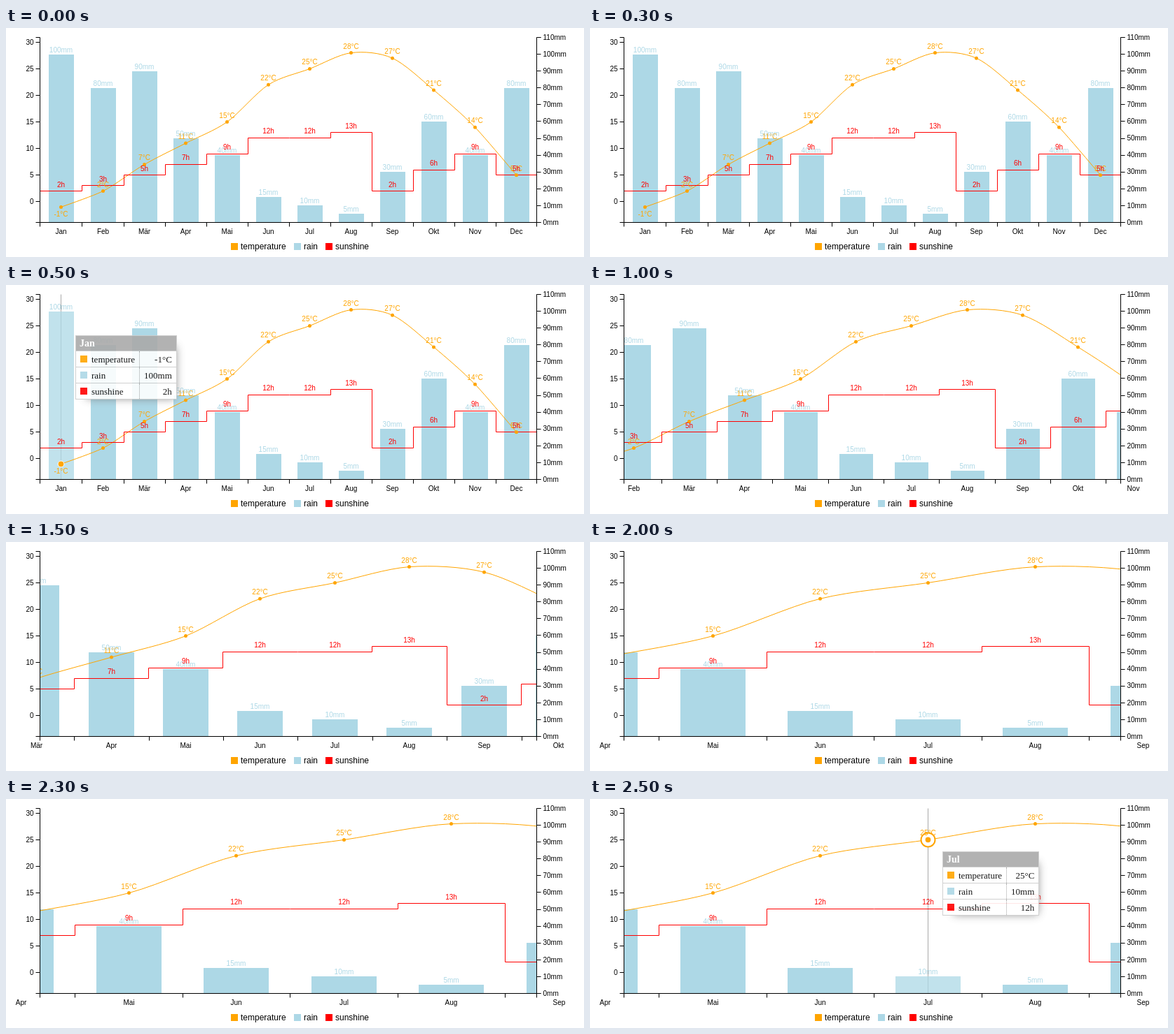
An HTML page with a canvas for the animation above (3000 ms loop, 825 by 328 pixels).

```html
<!DOCTYPE html>
<html lang="de">
<head>
<meta charset="utf-8">
<title>Climate chart</title>
<style>
  html, body { margin: 0; width: 100%; height: 100%; overflow: hidden; background: #fff; }
  canvas { display: block; }
  #tip { position: absolute; opacity: .9; font-family: "Liberation Serif", serif; }
  #tip table {
    border-collapse: collapse; border-spacing: 0; background: #fff;
    box-shadow: 7px 7px 12px -9px #777;
  }
  #tip tr { border: 1px solid #ccc; height: 23px; }
  #tip tr:first-child { height: 22px; }
  #tip th { background: #aaa; color: #fff; font-size: 14px; line-height: 16px; padding: 2px 5px; text-align: left; }
  #tip td { font-size: 13px; line-height: 15px; padding: 3px 6px; border-left: 1px dotted #999; white-space: nowrap; }
  #tip td:last-child { text-align: right; }
  #tip span { display: inline-block; width: 10px; height: 10px; margin-right: 6px; }
</style>
</head>
<body>
<canvas id="chart" width="825" height="328"></canvas>
<div id="tip" hidden></div>
<script>
const ctx = document.getElementById('chart').getContext('2d');
const tip = document.getElementById('tip');

const months = ['Jan', 'Feb', 'Mär', 'Apr', 'Mai', 'Jun', 'Jul', 'Aug', 'Sep', 'Okt', 'Nov', 'Dec'];
const series = {
  temperature: { color: 'orange', unit: '°C', values: [-1, 2, 7, 11, 15, 22, 25, 28, 27, 21, 14, 5] },
  rain: { color: 'lightblue', unit: 'mm', values: [100, 80, 90, 50, 40, 15, 10, 5, 30, 60, 40, 80] },
  sunshine: { color: 'red', unit: 'h', values: [2, 3, 5, 7, 9, 12, 12, 13, 2, 6, 9, 5] }
};
const { temperature, rain, sunshine } = series;

const left = 48.5, right = 757.5, top_ = 13.5, bottom = 278.5;
const height = bottom - top_;

// Zoom levels: category width and scroll offset
const full = { step: 709 / 12, shift: 0 };
const near = { step: 79.3, shift: -106.02 };
const nearer = { step: 106.4, shift: -272.1 };
const nearest = { step: 153.5, shift: -564.7 };

const scenes = [
  { view: full },
  { view: full, hover: 0, tip: [99, 72] },
  { view: near },
  { view: nearer },
  { view: nearest },
  { view: nearest, hover: 6, selected: true, tip: [503, 75] }
];
const SCENE_MS = 500;

const yMain = v => top_ + (30.9 - v) * height / 34.8;
const yRain = v => bottom - v * height / 110;
const crisp = v => Math.floor(v) + .5;

function line(color, ...points) {
  ctx.strokeStyle = color;
  ctx.lineWidth = 1;
  ctx.beginPath();
  points.forEach(p => ctx.lineTo(...p));
  ctx.stroke();
}

function text(str, x, y, align, color = '#000', size = 10) {
  ctx.font = `${size}px "Liberation Sans", Arial, sans-serif`;
  ctx.textAlign = align;
  ctx.fillStyle = color;
  ctx.fillText(str, x, Math.round(y));
}

function circle(x, y, r, fill, stroke, width) {
  ctx.beginPath();
  ctx.arc(x, y, r, 0, 2 * Math.PI);
  ctx.fillStyle = fill;
  ctx.fill();
  if (stroke) {
    ctx.strokeStyle = stroke;
    ctx.lineWidth = width;
    ctx.stroke();
  }
}

function drawBars(xs, half, hover) {
  ctx.fillStyle = rain.color;
  rain.values.forEach((v, i) => {
    const x0 = Math.round(xs[i] - half * .6), x1 = Math.round(xs[i] + half * .6);
    const y = Math.round(yRain(v) - .01);
    ctx.globalAlpha = i === hover ? .75 : 1;
    ctx.fillRect(x0, y, x1 - x0, 278 - y);
  });
  ctx.globalAlpha = 1;
}

// Cardinal spline with tension 0.7 and quadratic end pieces
function drawSpline(points) {
  const last = points.length - 1;
  const control = (i, k) => [0, 1].map(a => points[i][a] + k * .15 * (points[i + 1][a] - points[i - 1][a]));
  ctx.beginPath();
  ctx.moveTo(...points[0]);
  ctx.quadraticCurveTo(...control(1, -2 / 3), ...points[1]);
  for (let i = 2; i < last; i++) {
    ctx.bezierCurveTo(...control(i - 1, 1), ...control(i, -1), ...points[i]);
  }
  ctx.quadraticCurveTo(...control(last - 1, 2 / 3), ...points[last]);
  ctx.strokeStyle = temperature.color;
  ctx.lineWidth = 1;
  ctx.stroke();
}

function drawSteps(xs, half) {
  const path = [];
  sunshine.values.forEach((v, i) => {
    const y = crisp(yMain(v));
    const from = i ? (xs[i - 1] + xs[i]) / 2 : xs[i] - half;
    const to = i < 11 ? (xs[i] + xs[i + 1]) / 2 : xs[i] + half;
    path.push([crisp(from), y], [crisp(to), y]);
  });
  line(sunshine.color, ...path);
}

function drawLabels(xs) {
  for (const s of Object.values(series)) {
    s.values.forEach((v, i) => {
      const y = s === rain ? yRain(v) - 3 : yMain(v) + (v < 0 ? 13.5 : -6);
      text(v + s.unit, xs[i], y, 'center', s.color);
    });
  }
}

function drawAxes(xs, half) {
  const black = '#000';
  line(black, [left - 6, top_], [left, top_], [left, bottom], [left - 6, bottom]);
  line(black, [right + 6, top_], [right, top_], [right, bottom], [right + 6, bottom]);
  line(black, [left, bottom + 6], [left, bottom], [right, bottom], [right, bottom + 6]);
  for (let v = 0; v <= 30; v += 5) {
    const y = yMain(v);
    line(black, [left - 6, crisp(y)], [left, crisp(y)]);
    text(v, left - 9, y + 3.2, 'right');
  }
  for (let v = 0; v <= 110; v += 10) {
    const y = yRain(v);
    line(black, [right, crisp(y)], [right + 6, crisp(y)]);
    text(v + 'mm', right + 9, y + 3.2, 'left');
  }
  months.forEach((name, i) => {
    const x = xs[i] + half;
    if (x > left && x < right) line(black, [x, bottom], [x, bottom + 6]);
    text(name, xs[i], 295, 'center');
  });
}

function drawLegend() {
  [321, 411, 456].forEach((x, i) => {
    const name = Object.keys(series)[i];
    ctx.fillStyle = series[name].color;
    ctx.fillRect(x, 308, 10, 10);
    text(name, x + 14, 317, 'left', '#000', 12);
  });
}

function showTip({ hover, tip: place }) {
  tip.hidden = !place;
  if (!place) return;
  const rows = Object.entries(series).map(([name, s]) =>
    `<tr><td><span style="background:${s.color}"></span>${name}</td><td>${s.values[hover]}${s.unit}</td></tr>`);
  tip.innerHTML = `<table><tr><th colspan="2">${months[hover]}</th></tr>${rows.join('')}</table>`;
  tip.style.left = place[0] + 'px';
  tip.style.top = place[1] + 'px';
}

function draw(scene) {
  const { view, hover, selected } = scene;
  const half = Math.ceil(view.step / 2);
  const xs = months.map((_, i) => left + Math.ceil(view.shift + i * view.step) + half);
  const points = temperature.values.map((v, i) => [xs[i], yMain(v)]);

  ctx.fillStyle = '#fff';
  ctx.fillRect(0, 0, 825, 328);

  ctx.save();
  ctx.beginPath();
  ctx.rect(48, 13, 709, 266);
  ctx.clip();
  if (hover !== undefined) line('#aaa', [xs[hover], top_], [xs[hover], bottom]);
  drawBars(xs, half, hover);
  drawSpline(points);
  drawSteps(xs, half);
  if (selected) circle(...points[hover], 10, '#fff', temperature.color, 2);
  points.forEach((p, i) => {
    if (i === hover) circle(...p, 4.375, temperature.color, '#fff', 1);
    else circle(...p, 2.5, temperature.color);
  });
  drawLabels(xs);
  ctx.restore();

  drawAxes(xs, half);
  drawLegend();
  showTip(scene);
}

let current = -1;
function tick() {
  const index = Math.floor(performance.now() / SCENE_MS) % scenes.length;
  if (index !== current) draw(scenes[current = index]);
  requestAnimationFrame(tick);
}
tick();
</script>
</body>
</html>
```
